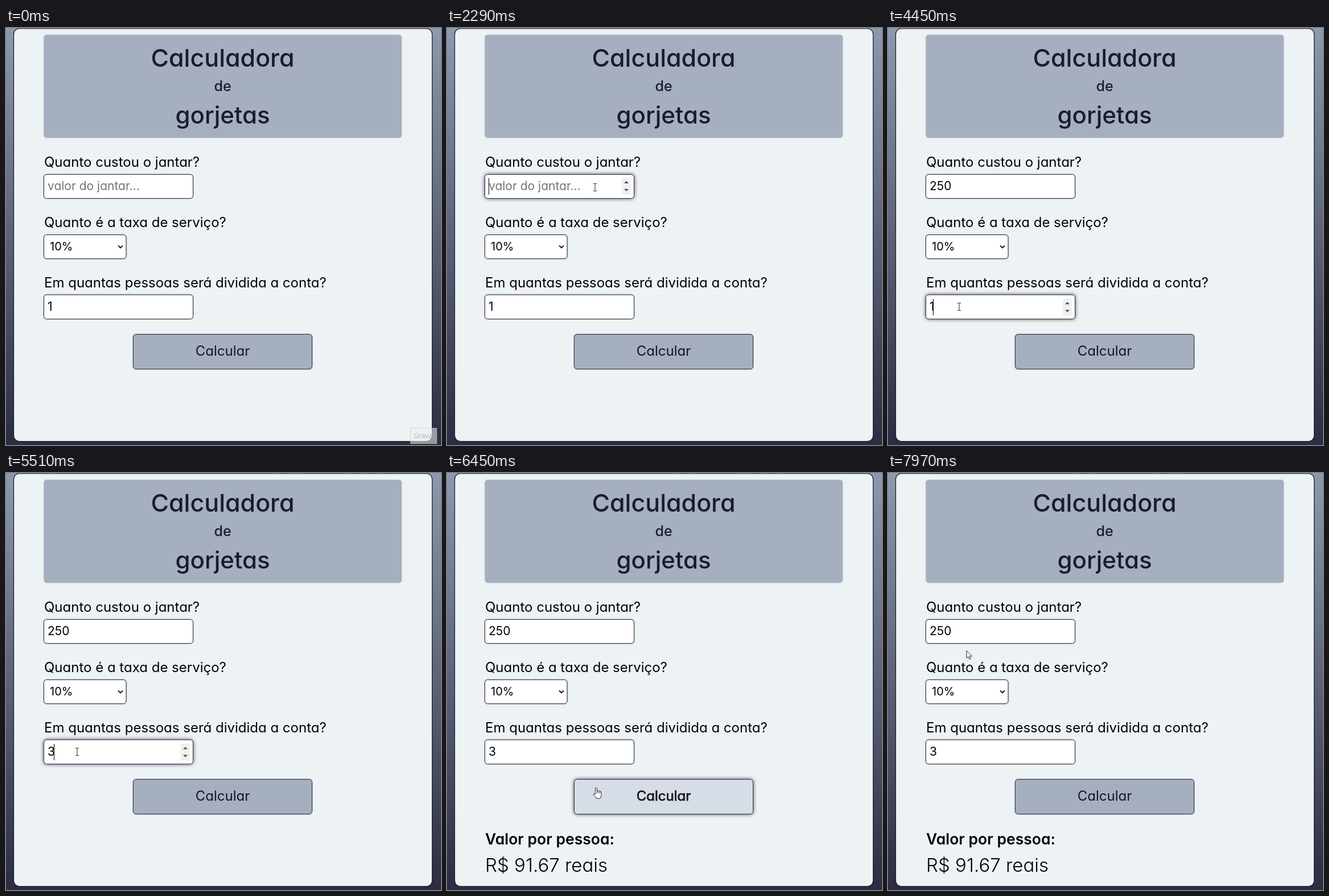
Animation, 764 px wide and 733 px high, one loop 8 s. Source, as an HTML page:

```html
<!DOCTYPE html>
<html lang="pt-BR">
<head>
<meta charset="utf-8">
<title>Calculadora de gorjetas</title>
<style>
html, body { margin: 0; width: 100%; height: 100%; overflow: hidden; }
svg { display: block; width: 764px; height: 733px; }
text { font: 400 24px Inter, sans-serif; font-feature-settings: "cv11"; font-optical-sizing: none; white-space: pre; }
.title { font-weight: 500; text-anchor: middle; fill: #1a1b2e; }
.small { font-size: 21px; }
.box { stroke: #2b2d42; fill: #fff; filter: drop-shadow(0 0 1px #2b2d4280); }
.focus { filter: drop-shadow(0 0 3px #1a1b2ecc); }
#button rect { fill: #a6afc0; }
#button text { text-anchor: middle; fill: #15161f; }
#button.hover rect { fill: #d7dde6; filter: drop-shadow(0 0 3px #1a1b2ecc); }
#button.hover text { stroke: #15161f; stroke-width: .7px; }
</style>
</head>
<body>
<svg viewBox="0 0 764 733">
  <defs>
    <linearGradient id="sky" x2="0" y2="1">
      <stop stop-color="#8d99ae"/><stop offset="1" stop-color="#2b2d42"/>
    </linearGradient>
    <g id="spin">
      <rect x="307" y="-15" width="16" height="30" fill="#f0f0f0"/>
      <path d="M311 -5l4 -4 4 4zM311 5l4 4 4 -4z" fill="#4d4d4d"/>
    </g>
  </defs>
  <rect width="764" height="733" fill="url(#sky)"/>
  <rect x="13.5" y="1" width="735" height="725.5" rx="10" fill="#edf2f4" stroke="#15161f" stroke-width="1.2"/>
  <rect x="66.5" y="12" width="628.5" height="181" rx="5" fill="#a6afc0" style="filter:drop-shadow(0 0 1px #8d99ae80)"/>
  <text class="title" x="380.5" y="68" style="font-size:43px">Calculadora</text>
  <text class="title" x="380.5" y="111" style="font-size:25px">de</text>
  <text class="title" x="380.5" y="168" style="font-size:42px">gorjetas</text>

  <text x="67" y="244">Quanto custou o jantar?</text>
  <rect id="costBox" class="box" x="66.5" y="257.5" width="262" height="42" rx="5"/>
  <use id="costSpin" href="#spin" y="278"/>
  <text id="cost" class="small" x="73" y="285"></text>

  <text x="67" y="350">Quanto é a taxa de serviço?</text>
  <rect class="box" x="66.5" y="363.5" width="144.5" height="42" rx="5"/>
  <text x="77" y="391" style="font-size:20px">10%</text>
  <path d="M197 382.5l4 4 4 -4" fill="none" stroke="#111" stroke-width="1.8"/>

  <text x="67" y="456">Em quantas pessoas será dividida a conta?</text>
  <rect id="peopleBox" class="box" x="66.5" y="469" width="262" height="42.5" rx="5"/>
  <use id="peopleSpin" href="#spin" y="490.5"/>
  <text id="people" class="small" x="73" y="497"></text>
  <rect id="caret" width="1" height="29"/>

  <g id="button">
    <rect class="box" x="223.5" y="538.5" width="314" height="61" rx="5"/>
    <text x="380.5" y="576">Calcular</text>
  </g>
  <g id="result">
    <text x="67" y="653" style="font-size:26.5px;font-weight:600">Valor por pessoa:</text>
    <text x="67" y="701" style="font-size:33px;font-weight:300">R$ 91.67 reais</text>
  </g>
  <g id="tip">
    <rect x="710.5" y="703.5" width="46" height="27" fill="#f0f0f0" fill-opacity=".55" stroke="#c4c8d0" stroke-opacity=".7"/>
    <text x="716" y="721" fill="#aeb2b8" style="font:12px 'Open Sans',sans-serif">Gravar</text>
  </g>
  <g id="pointer">
    <path id="beam" d="M-3 -6.5h2.5l.5 .5 .5 -.5h2.5M-3 6.5h2.5l.5 -.5 .5 .5h2.5M0 -6v12" fill="none" stroke="#222"/>
    <path id="arrow" d="M0 .5v13l3 -2.7 2 4.7 2.2 -1 -2 -4.5h4.2z" fill="#fff" stroke="#222"/>
    <path id="hand" d="M-1.5 1q1.5 -2 3 0v5q1.5 -1.3 2.7 .3 1.5 -1 2.5 .5 2 -.7 2.3 1.2v5q0 3 -2 6h-6.5q-1.5 -3 -5 -6.500 -.6 -2.300 1.500 -1.800l1.500 1.300zM1.500 6v4M4.200 6.500v3.500M6.700 7v3" fill="#fff" stroke="#222"/>
  </g>
</svg>
<script>
const $ = id => document.getElementById(id);
const show = (id, on) => $(id).setAttribute('display', on ? 'inline' : 'none');
const at = (steps, t) => steps.filter(s => s[0] <= t).pop();
const within = (t, a, b) => t >= a && t < b;

// time, x, y of the pointer's hot spot
const path = [
  [70, 735, 716], [810, 263, 287], [880, 260, 279.5], [3640, 260, 279.5],
  [3770, 161.5, 498], [3930, 118, 527], [4250, 124.5, 490], [5640, 124.5, 490],
  [5970, 249, 549], [6120, 262, 553], [7310, 262, 553], [7440, 261, 547], [7960, 138, 312]
];
// time, value, caret x
const costSteps = [[0, '', 73], [2420, '2', 84], [2620, '25', 97], [3420, '250', 110]];
const peopleSteps = [[0, '1', 79], [5180, '', 73], [5510, '3', 84]];
const caretOn = [[1210, 1760], [2290, 3220], [3420, 3950], [4450, 4980], [5510, 6040]];

function pointerAt(t) {
  const i = path.findIndex(p => p[0] > t);
  if (i < 1) return (i ? path[path.length - 1] : path[0]).slice(1);
  const [t0, x0, y0] = path[i - 1], [t1, x1, y1] = path[i];
  const u = (t - t0) / (t1 - t0), k = u * u * (3 - 2 * u);
  return [x0 + (x1 - x0) * k, y0 + (y1 - y0) * k];
}

function draw(now) {
  const t = now % 8000;
  const [x, y] = pointerAt(t);
  const over = (l, top, r, b) => t >= 70 && x > l && x < r && y > top && y < b;
  const overCost = over(67, 257, 328, 300);
  const overPeople = over(67, 469, 328, 512);
  const overButton = over(223, 538, 538, 600);
  const costFocus = within(t, 1210, 4450), peopleFocus = within(t, 4450, 6380);
  const cost = at(costSteps, t), people = at(peopleSteps, t);

  $('cost').textContent = cost[1] || 'valor do jantar...';
  $('cost').setAttribute('fill', cost[1] ? '#000' : '#757575');
  $('people').textContent = people[1];
  $('costBox').classList.toggle('focus', costFocus);
  $('peopleBox').classList.toggle('focus', peopleFocus);
  $('button').classList.toggle('hover', overButton);
  show('costSpin', costFocus || overCost);
  show('peopleSpin', peopleFocus || overPeople);

  show('caret', caretOn.some(([a, b]) => within(t, a, b)));
  $('caret').setAttribute('x', (costFocus ? cost : people)[2]);
  $('caret').setAttribute('y', costFocus ? 264 : 476);

  show('result', t >= 6450);
  show('tip', t < 140);
  show('pointer', t >= 70);
  show('beam', overCost || overPeople);
  show('hand', overButton);
  show('arrow', !overCost && !overPeople && !overButton);
  $('pointer').setAttribute('transform', `translate(${Math.round(x)} ${Math.round(y)})`);
  requestAnimationFrame(draw);
}
requestAnimationFrame(draw);
</script>
</body>
</html>
```
